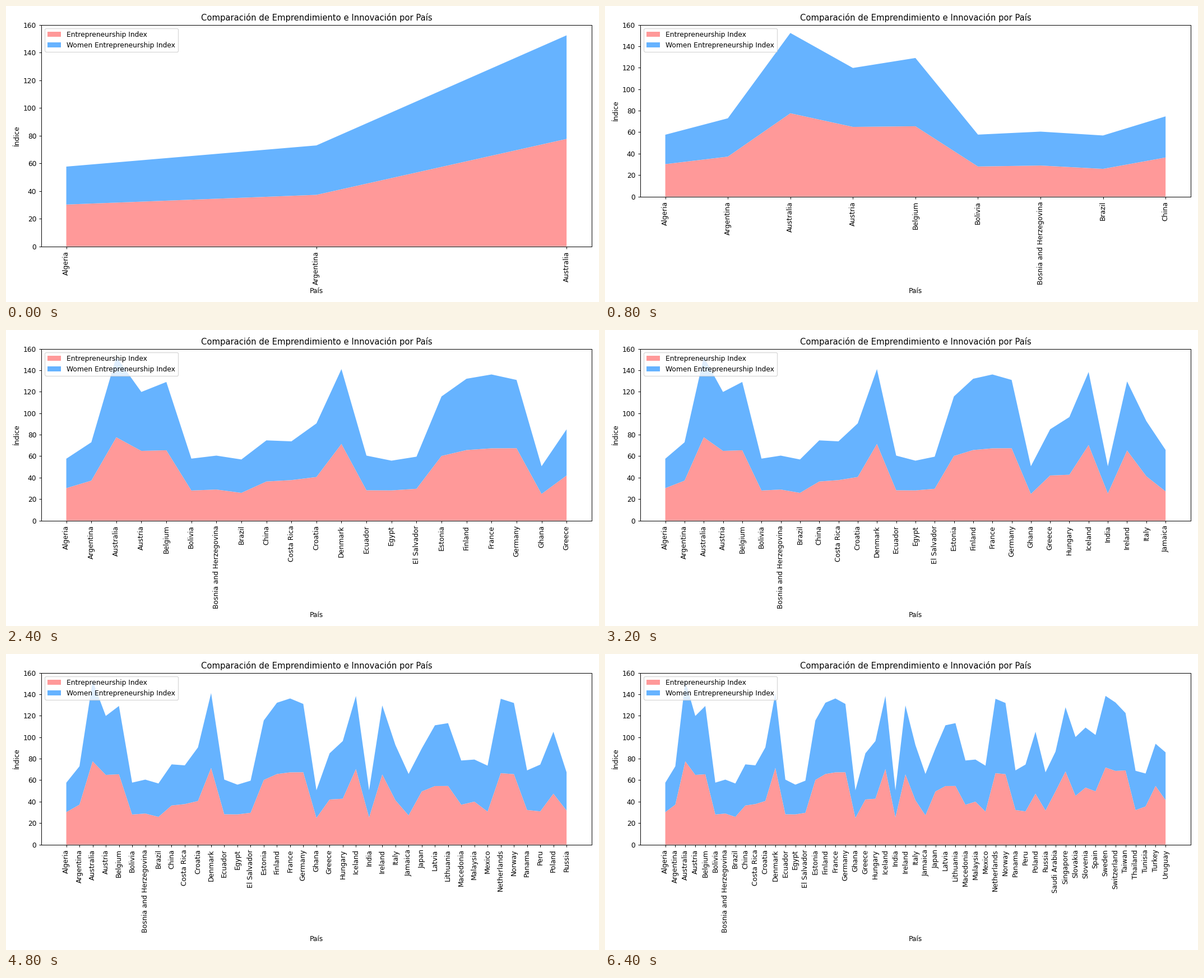
Animation, 1058 px wide and 529 px high, one loop 6800 ms. Source, as a matplotlib script:

```python
import matplotlib.pyplot as plt
from matplotlib.animation import FuncAnimation

WIDTH, HEIGHT = 1058, 529
DPI = WIDTH / 12
STEP = 3          # countries added per frame
INTERVAL = 400    # ms

# country: (entrepreneurship index, women entrepreneurship index)
DATA = {
    "Algeria": (30.2, 27.4),
    "Argentina": (37.2, 35.7),
    "Australia": (77.6, 74.8),
    "Austria": (64.9, 54.9),
    "Belgium": (65.5, 63.6),
    "Bolivia": (28.0, 29.7),
    "Bosnia and Herzegovina": (28.9, 31.6),
    "Brazil": (25.8, 31.1),
    "China": (36.4, 38.3),
    "Costa Rica": (37.7, 36.1),
    "Croatia": (40.6, 49.9),
    "Denmark": (71.4, 69.7),
    "Ecuador": (28.2, 32.3),
    "Egypt": (28.1, 27.7),
    "El Salvador": (29.6, 29.9),
    "Estonia": (60.2, 55.4),
    "Finland": (65.7, 66.4),
    "France": (67.3, 68.8),
    "Germany": (67.4, 63.6),
    "Ghana": (24.8, 25.8),
    "Greece": (42.0, 43.0),
    "Hungary": (42.7, 53.7),
    "Iceland": (70.4, 68.0),
    "India": (25.3, 25.3),
    "Ireland": (65.3, 64.3),
    "Italy": (41.3, 51.4),
    "Jamaica": (27.2, 38.6),
    "Japan": (49.5, 40.0),
    "Latvia": (54.5, 56.6),
    "Lithuania": (54.6, 58.5),
    "Macedonia": (37.1, 41.2),
    "Malaysia": (40.0, 39.2),
    "Mexico": (30.7, 42.8),
    "Netherlands": (66.5, 69.3),
    "Norway": (65.6, 66.3),
    "Panama": (32.2, 36.9),
    "Peru": (30.9, 43.6),
    "Poland": (47.4, 57.7),
    "Russia": (31.7, 35.6),
    "Saudi Arabia": (49.6, 37.0),
    "Singapore": (68.1, 59.8),
    "Slovakia": (45.4, 54.8),
    "Slovenia": (53.1, 55.9),
    "Spain": (49.6, 52.5),
    "Sweden": (71.8, 66.7),
    "Switzerland": (68.6, 63.7),
    "Taiwan": (69.1, 53.4),
    "Thailand": (32.1, 36.6),
    "Tunisia": (35.5, 30.7),
    "Turkey": (54.6, 39.3),
    "Uruguay": (41.4, 44.5),
}
COUNTRIES = list(DATA)
GENERAL, WOMEN = zip(*DATA.values())

fig, ax = plt.subplots(figsize=(WIDTH / DPI, HEIGHT / DPI), dpi=DPI)


def draw(frame):
    n = STEP * (frame + 1)
    ax.clear()
    ax.stackplot(
        range(n), GENERAL[:n], WOMEN[:n],
        labels=["Entrepreneurship Index", "Women Entrepreneurship Index"],
        colors=["#ff9999", "#66b3ff"],
    )
    ax.set_title("Comparación de Emprendimiento e Innovación por País")
    ax.set_xlabel("País")
    ax.set_ylabel("Índice")
    ax.set_xticks(range(n), COUNTRIES[:n], rotation=90)
    ax.legend(loc="upper left")
    fig.tight_layout()


anim = FuncAnimation(
    fig, draw, frames=len(COUNTRIES) // STEP, init_func=lambda: draw(0),
    interval=INTERVAL, repeat=True, repeat_delay=0,
)
plt.show()
```
